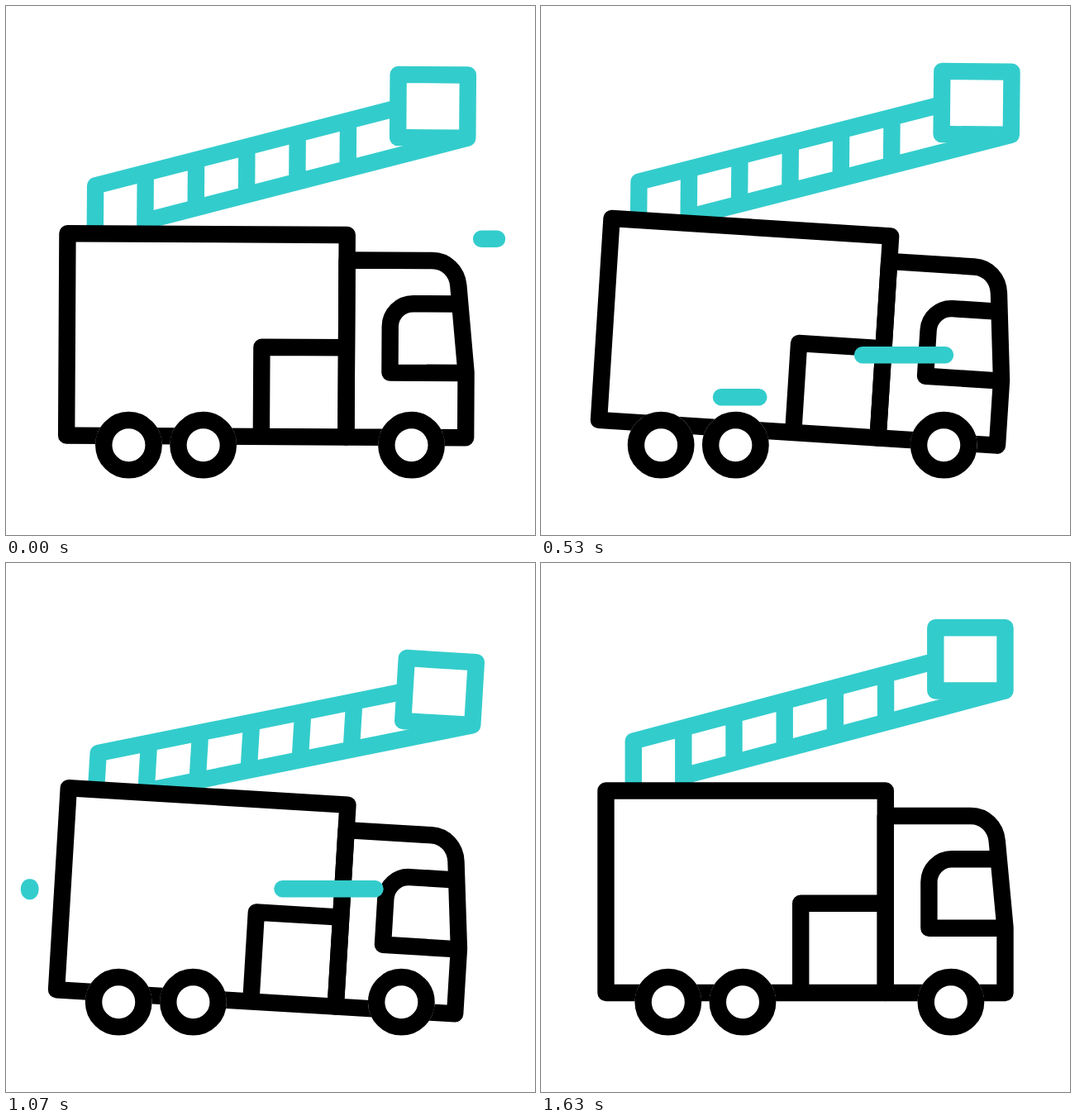
An HTML page that plays this animation: 640x640 px, repeating every 1.67 s.

```html
<!DOCTYPE html>
<html lang="en">
<head>
<meta charset="utf-8">
<title>Fire truck</title>
<style>
  html, body { margin: 0; width: 100%; height: 100%; overflow: hidden; background: #fff; }
  svg { display: block; width: 100%; height: 100%; }
  .ink, .teal { fill: none; stroke: #000; stroke-width: 20.4; stroke-linejoin: round; }
  .teal { stroke: #33cccc; }
  #streaks { fill: #33cccc; }
</style>
</head>
<body>
<svg viewBox="0 0 640 640">
  <g id="body">
    <g id="ladder" class="teal"></g>
    <rect x="78.5" y="275.5" width="338.3" height="244.5" fill="#fff"/>
    <g class="ink">
      <rect x="78.5" y="275.5" width="338.3" height="244.5"/>
      <path d="M416.8 306H520C537 306 550 319 551.7 336L561.5 441V520H416.8Z"/>
      <path d="M555 358.3H497A27.7 27.7 0 0 0 469.4 386V441.8H561"/>
      <path d="M314.2 520V411.8H416.8"/>
    </g>
  </g>
  <g id="wheels"></g>
  <g id="streaks"></g>
</svg>
<script>
const LOOP = 1670, STEP = 33.3, LAST = 49;
const CAP = 10.2, SWEEP = 10;
const $ = id => document.getElementById(id);

function add(parent, tag, attrs) {
  const el = document.createElementNS('http://www.w3.org/2000/svg', tag);
  for (const key in attrs) el.setAttribute(key, attrs[key]);
  return parent.appendChild(el);
}

// Ladder: two sloping beams, rungs and the basket
const SLOPE = 0.265;
const upper = x => 215.5 - SLOPE * (x - 111.8);
const lower = x => 257.7 - SLOPE * (x - 172.3);
let d = `M111.8 275V215.5L477.3 ${upper(477.3)}M172.3 275V${lower(172.3)}L561.5 154.5`;
for (let i = 0; i < 5; i++) {
  const x = 172.3 + 61.2 * i;
  d += `M${x} ${upper(x)}V${lower(x)}`;
}
add($('ladder'), 'path', { d });
add($('ladder'), 'rect', { x: 477.3, y: 78.3, width: 84.2, height: 76.2 });

for (const cx of [153.8, 244, 495.9]) {
  add($('wheels'), 'circle', { cx, cy: 531.2, r: 40.4, fill: '#fff' });
  add($('wheels'), 'circle', { cx, cy: 531.2, r: 30.2, class: 'ink' });
}

// The head of a streak sweeps left, and its tail follows after a lag
function streak(y, from, to, begin, lag, half = CAP) {
  const el = add($('streaks'), 'rect', { y: y - half, height: 2 * half, rx: CAP, ry: half });
  const at = t => from + (to - from) * ramp(t, begin, begin + SWEEP);
  return t => {
    const head = at(t), tail = at(t - lag);
    el.setAttribute('x', head - CAP);
    el.setAttribute('width', tail - head + 2 * CAP);
    el.style.display = t > begin && t < begin + lag + SWEEP ? '' : 'none';
  };
}

const streaks = [
  streak(281.7, 594, 394, -1.9, 5.4),
  streak(379, 280, 20, 3.4, 2.5),
  streak(422.3, 589, 389, 5.2, 5.8),
  streak(473.3, 428, 218, 3.2, 5.8),
  streak(394.7, 227, 28, 17.9, 4.6, 12.5),
  streak(481.7, 570, 334, 16.2, 4.6, 12),
  streak(117.7, 378, 197, 16.2, 4.6),
  streak(394.2, 574, 319, 23.5, 3.5)
];

function ramp(t, a, b) {
  const s = Math.min(1, Math.max(0, (t - a) / (b - a)));
  return s * s * (3 - 2 * s);
}

// Eases up from a to b and back down from b to c
const pulse = (t, a, b, c) => ramp(t, a, b) - ramp(t, b, c);

function draw(t) {
  const drive = -50 * pulse(t, -2.4, 9.4, 23.1)
    + 37.5 * pulse(t, 9.4, 23.1, 35.1)
    - 28.5 * pulse(t, 23.1, 35.1, 49);
  const lean = ramp(t, -2.4, 11) - ramp(t, 30.5, 41.2);
  const hop = -25 * pulse(t, 12, 19, 25) - 2.4 * pulse(t, 32, 37, 45);
  const drop = pulse(t, -2.4, 11, 18.5);
  const whip = pulse(t, 11, 18.5, 32);

  $('wheels').setAttribute('transform', `translate(${drive} 0)`);
  $('body').setAttribute('transform',
    `translate(${drive} ${hop}) rotate(${3.65 * lean} 140 520)`);
  $('ladder').setAttribute('transform',
    `translate(0 ${16.5 * lean + 8.5 * drop - 7 * whip}) rotate(${1.2 * drop - 4.6 * whip} 112 275)`);
  for (const update of streaks) update(t);
}

const start = performance.now();
function tick() {
  const ms = (performance.now() - start) % LOOP;
  draw(Math.min(LAST, Math.floor((ms + 5) / STEP)));
  requestAnimationFrame(tick);
}
tick();
</script>
</body>
</html>
```
